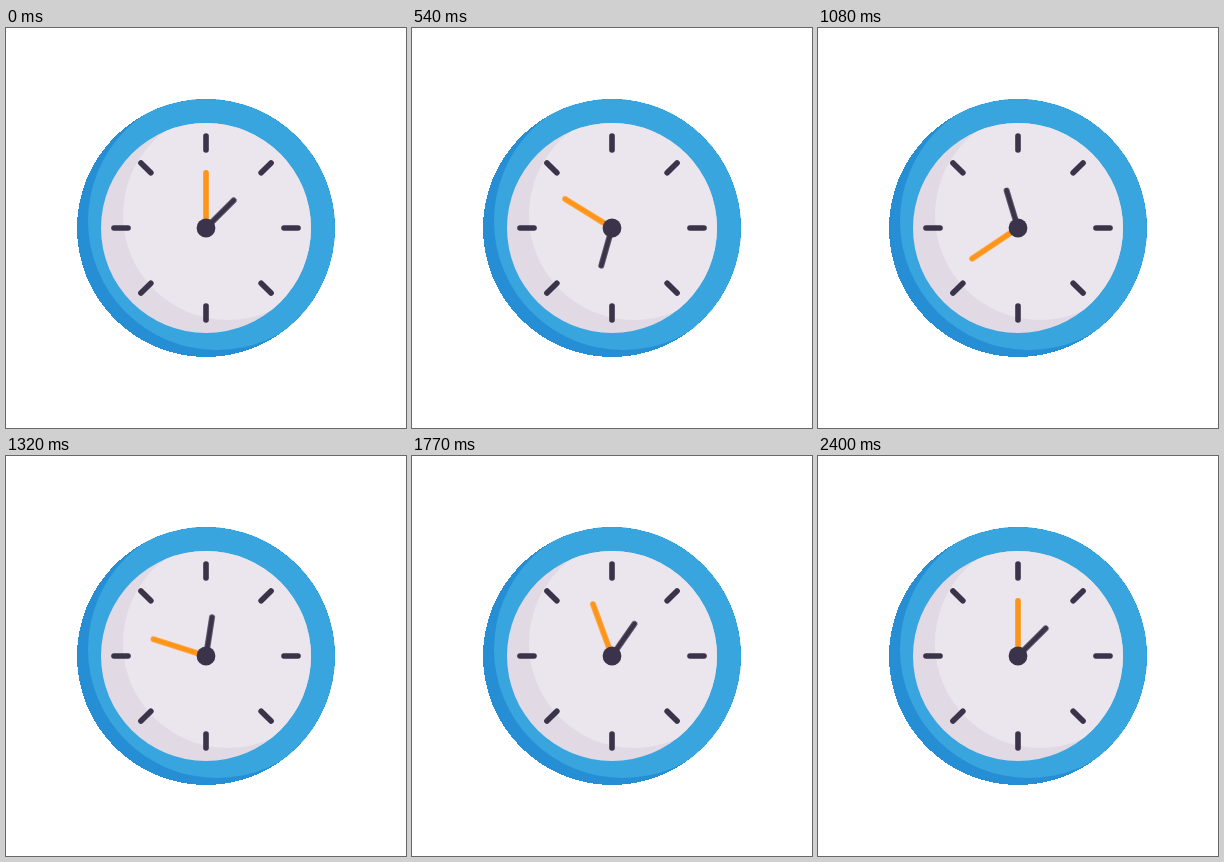
An HTML page without scripts for the animation above (4.46 s loop, 400 by 400 pixels).

```html
<!DOCTYPE html>
<html lang="en">
<head>
<meta charset="utf-8">
<title>Clock</title>
<style>
  html, body { margin: 0; width: 100%; height: 100%; overflow: hidden; background: #fff; }
  svg { display: block; width: 100%; height: 100%; }
  .ink { stroke: #3a3349; }
  .ticks, .hand { fill: none; stroke-width: 5.6; stroke-linecap: round; }
  .hand { animation: spin 4460ms infinite; }
  .hour { --from: 45deg; --to: 405deg; }
  .minute { --from: 0deg; --to: 720deg; stroke: #ff9518; }

  /* Turns for 2400 ms, then rests */
  @keyframes spin {
    0% { transform: rotate(var(--from)); animation-timing-function: cubic-bezier(.333, 0, 0, 1); }
    53.812%, 100% { transform: rotate(var(--to)); }
  }
</style>
</head>
<body>
<svg viewBox="-200 -200 400 400">
  <defs>
    <clipPath id="rim"><circle r="129" shape-rendering="crispEdges"/></clipPath>
    <clipPath id="face"><circle r="105"/></clipPath>
    <path id="tick" d="M0-92V-78"/>
    <g id="pair">
      <use href="#tick"/>
      <use href="#tick" transform="rotate(45)"/>
    </g>
  </defs>

  <circle r="129" fill="#268ed4" shape-rendering="crispEdges"/>
  <circle cx="11" cy="-7" r="129" fill="#38a5de" clip-path="url(#rim)" transform="translate(0 0)" style="clip-path: url(#rim)"/>
  <circle r="105" fill="#e1dae5"/>
  <g clip-path="url(#face)">
    <circle cx="22" cy="-13" r="105" fill="#ebe6ed"/>
  </g>

  <g class="ticks ink">
    <use href="#pair"/>
    <use href="#pair" transform="rotate(90)"/>
    <use href="#pair" transform="rotate(180)"/>
    <use href="#pair" transform="rotate(270)"/>
  </g>

  <path class="hand minute" d="M0 0V-55.2"/>
  <path class="hand hour ink" d="M0 0V-39.2"/>
  <circle r="9.4" fill="#3a3349"/>
</svg>
</body>
</html>
```
